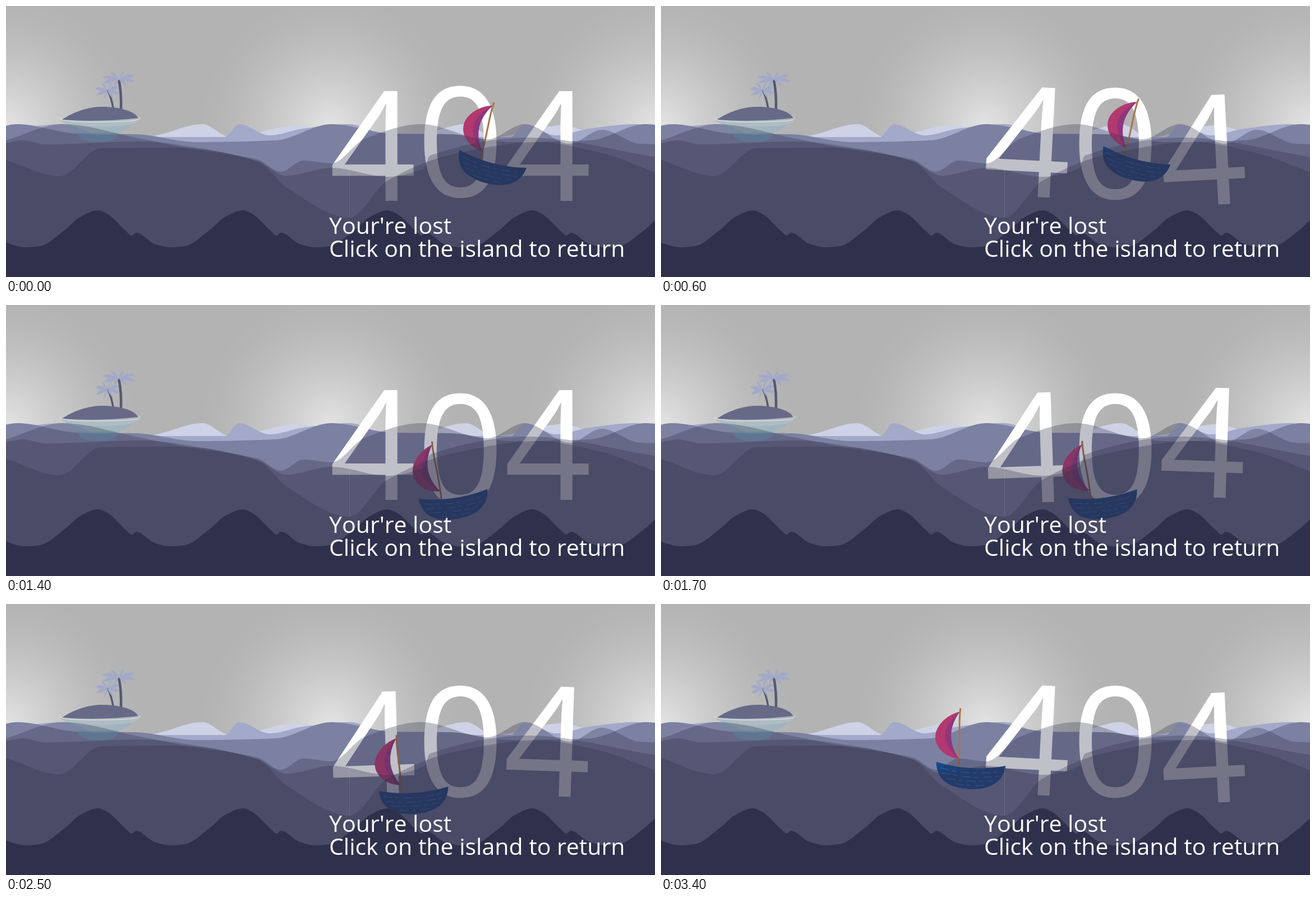
An HTML page with a canvas for the animation above (3.5 s loop, 1157 by 484 pixels).

```html
<!DOCTYPE html>
<html lang="en">
<head>
<meta charset="utf-8">
<title>404</title>
<style>
html, body { margin: 0; width: 100%; height: 100%; overflow: hidden; background: #b3b3b3; }
canvas { display: block; }
</style>
</head>
<body>
<canvas id="stage" width="1157" height="484"></canvas>
<script>
const W = 1157, H = 484, LOOP = 3500, STEP = 100, TAU = Math.PI * 2;
const ctx = document.getElementById('stage').getContext('2d');
const FONT = 'px "Open Sans", "Noto Sans", sans-serif';
const SHADE = 'rgba(47,48,74,0.3)';

// Monotone cubic through column k of the keys; column 0 is the position
function curve(keys, k = 1) {
  const last = keys.length - 2;
  const slope = j => (keys[j + 1][k] - keys[j][k]) / (keys[j + 1][0] - keys[j][0]);
  const tangent = j => {
    if (j === 0) return slope(0);
    if (j > last) return slope(last);
    const a = slope(j - 1), b = slope(j);
    return a * b > 0 ? 2 * a * b / (a + b) : 0;
  };
  return x => {
    let i = 0;
    while (i < last && x >= keys[i + 1][0]) i++;
    const [a, b] = [keys[i], keys[i + 1]];
    const h = b[0] - a[0], u = (x - a[0]) / h, v = 1 - u;
    return a[k] * (1 + 2 * u) * v * v + b[k] * u * u * (3 - 2 * u)
      + h * u * v * (v * tangent(i) - u * tangent(i + 1));
  };
}

// Mountain silhouette through a few peaks and valleys
function ridge(keys) {
  const y = curve(keys), path = new Path2D();
  path.moveTo(0, H);
  for (let x = 0; x <= W + 1; x++) path.lineTo(x, y(x));
  path.lineTo(W + 1, H);
  return path;
}
const tiled = (start, period, keys) => ridge([-1, 0, 1, 2, 3, 4].flatMap(
  n => keys.map(([x, y]) => [start + n * period + x, y])));

const far = [
  ['#cdd2e6', tiled(250, 470, [[0, 233], [100, 211], [150, 234], [270, 213], [350, 232]])],
  ['#a2a9c9', tiled(390, 510, [[0, 234], [25, 211], [80, 231], [140, 219], [222, 211], [300, 234]])],
  ['#7c81a2', tiled(20, 560, [[0, 211], [110, 228], [210, 229], [320, 243], [460, 240]])]
];
const near = [
  ridge([[0, 240], [100, 211], [240, 237], [330, 255], [448, 274], [490, 296], [530, 276], [580, 281],
    [640, 237], [740, 211], [858, 238], [925, 211], [1005, 246], [1062, 221], [1130, 246], [1160, 247]]),
  ridge([[0, 245], [30, 240], [70, 247], [245, 242], [345, 254], [448, 277], [500, 303], [580, 289],
    [680, 305], [745, 290], [756, 267], [930, 235], [1160, 270]]),
  ridge([[0, 275], [95, 304], [170, 254], [310, 253], [448, 277], [500, 324], [612, 378], [680, 312],
    [800, 264], [950, 243], [1060, 262], [1160, 298]])
];
const foreground = tiled(35, 258.3, [[0, 431], [25, 429], [70, 400], [97, 377], [129, 365], [145, 371],
  [180, 403], [189, 410], [197, 405], [230, 425]]);

function fill(color, path) {
  ctx.fillStyle = color;
  ctx.fill(typeof path === 'string' ? new Path2D(path) : path);
}
function stroke(color, width, path) {
  ctx.strokeStyle = color;
  ctx.lineWidth = width;
  ctx.stroke(new Path2D(path));
}

function sky() {
  ctx.fillStyle = '#b3b3b3';
  ctx.fillRect(0, 0, W, H);
  for (const x of [0, W / 2, W]) {
    const glow = ctx.createRadialGradient(x, 215, 0, x, 215, 235);
    for (let r = 0; r <= 1; r += 0.125) {
      glow.addColorStop(r, `rgba(255,255,255,${0.64 * (1 - r) ** 1.5})`);
    }
    ctx.fillStyle = glow;
    ctx.fillRect(0, 0, W, 260);
  }
}

// Drooping leaves fanned around a crown point
function crown(x, y, rx, ry) {
  for (let i = 0; i < 8; i++) {
    const a = 0.3 + i * TAU / 8, dx = rx * Math.cos(a), dy = ry * Math.sin(a);
    const cx = x + dx * 0.6, cy = y + dy * 0.6;
    fill('#a2a9c9', `M${x},${y} Q${cx},${cy - 9} ${x + dx},${y + dy} Q${cx},${cy + 4} ${x},${y}Z`);
  }
}

function island() {
  fill('rgba(140,180,198,0.5)', 'M104,206 H228 C222,222 198,230 165,230 C132,230 110,221 104,206Z');
  fill('rgba(110,170,192,0.45)', 'M127,226 H201 C199,240 183,243 165,243 C146,243 130,239 127,226Z');
  fill('#b0bcc3', 'M97,203 H237 C238,211 212,216 168,216 C124,216 99,210 97,203Z');
  stroke('#555870', 3.5, 'M191,183 Q188,163 181,150');
  stroke('#555870', 4.5, 'M205,186 Q206,155 201,131');
  crown(181, 152, 23, 16);
  crown(201, 131, 31, 14);
  fill('#666a87', 'M100,203 C114,193 140,181 168,180 C202,179 232,189 235,200 Q168,208 100,203Z');
  stroke('#e6eaee', 1, 'M97,199 C88,204 120,208 168,207 C222,207 246,204 237,198');
}

// Boat: time, x, y, degrees
const sailing = [
  [0, 868, 273, 15], [600, 848.5, 266.5, 15.5], [1150, 803, 336.5, -7.6], [1400, 797, 337.5, -8],
  [2100, 768.5, 335, -5.6], [2500, 726.5, 330, -3.7], [3000, 622, 308.5, -0.4], [3400, 552.5, 285.5, 3.2]
];
const [boatX, boatY, boatTilt] = [1, 2, 3].map(k => curve(sailing, k));

// Draws in a frame moved to x, y and turned by degrees
function posed(x, y, degrees, paint) {
  ctx.save();
  ctx.translate(x, y);
  ctx.rotate(degrees * TAU / 360);
  paint();
  ctx.restore();
}

function boat() {
  fill('#b3386f', 'M-25,-92 C-48,-85 -66,-65 -66,-46 C-66,-25 -45,-9 -22,-8 Q-58,-48 -25,-92Z');
  fill('#8f367c', 'M-25,-92 Q-74,-46 -22,-8 Q-53,-48 -25,-92Z');
  stroke('#a8734d', 3, 'M-24,-98 C-27,-72 -20,-40 -22,8');
  fill('#14488c', 'M-62,0 Q0,15 62,0 C60,30 35,45 0,45 C-35,45 -59,34 -62,0Z');
  ctx.setLineDash([16, 5, 7, 9]);
  for (let i = 0; i < 4; i++) {
    const w = 54 - 3 * i * i, y = 10 + 9 * i;
    stroke('#5c8ab4', 0.8, `M${-w},${y} Q0,${y + 12 - 3 * i} ${w},${y}`);
  }
}

function text(string, size, x, y) {
  ctx.fillStyle = '#fff';
  ctx.font = size + FONT;
  ctx.fontKerning = 'none';
  ctx.fillText(string, x, y);
}
const digit = (char, x, dy, degrees) =>
  posed(x + 78, 250 + dy, degrees, () => text(char, 273, -78, 98));

function draw(t) {
  sky();
  far.forEach(([color, path]) => fill(color, path));
  island();

  const sway = Math.sin(TAU * t / 2800);
  digit('4', 576, -8 * sway, 3 * sway);
  digit('0', 732, -8 * Math.cos(TAU * (t - 150) / 2800), 0);
  digit('4', 888, 8 * sway, -3 * sway);
  posed(boatX(t), boatY(t), boatTilt(t), boat);

  near.forEach(path => fill(SHADE, path));
  ctx.fillStyle = 'rgba(255,255,255,0.12)';
  ctx.fillRect(612, 291, 1, 86);
  fill('#2f304b', foreground);

  text("Your're lost", 41, 576, 407);
  text('Click on the island to return', 41, 576, 448);
}

const start = performance.now();
function tick() {
  const t = (performance.now() - start) % LOOP;
  draw(Math.floor(t / STEP) * STEP);
  requestAnimationFrame(tick);
}
tick();
</script>
</body>
</html>
```
